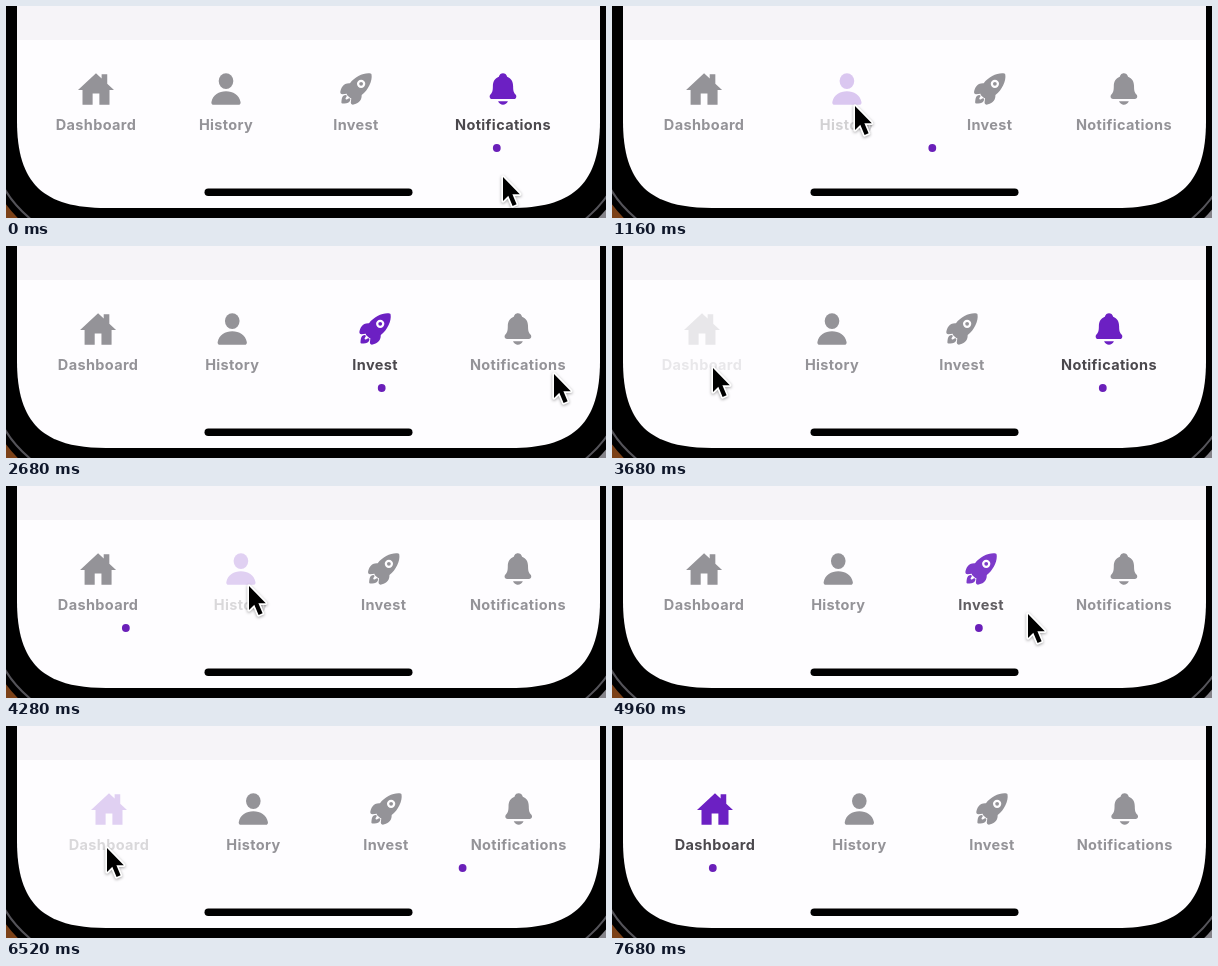
Animation, 600 px wide and 212 px high, one loop 7720 ms. Source, as an HTML page:

```html
<!DOCTYPE html>
<html lang="en">
<head>
<meta charset="utf-8">
<title>Tab bar</title>
<style>
  html, body { margin: 0; width: 100%; height: 100%; overflow: hidden; background: #000; }
  svg { display: block; width: 600px; height: 212px; }
  .tab { fill: #949398; }
  .tab text {
    font: 700 14.5px Inter, Roboto, sans-serif;
    letter-spacing: .35px;
    text-anchor: middle;
  }
  .tab.on { fill: #6c20c3; }
  .tab.on text { fill: #4b484d; }
  .icon { transform: translate(-18px, 65px) scale(.0703); }
  .cursor { filter: drop-shadow(0 1px 1.5px rgba(0, 0, 0, .35)); }
</style>
</head>
<body>
<svg viewBox="0 0 600 212">
  <defs>
    <clipPath id="screen">
      <path d="M11 0V115C11 178 38 202 100 202H505C567 202 594 178 594 115V0Z"/>
    </clipPath>
    <path id="rim" d="M-3 180Q7 199 27 215" fill="none" stroke="#55545a" stroke-width="2"/>
    <path id="corner" d="M-3 194Q5 206 15 215H-3Z"/>
  </defs>

  <rect width="600" height="212"/>
  <use href="#rim"/>
  <use href="#corner" fill="#7c4219"/>
  <g transform="matrix(-1 0 0 1 604 0)">
    <use href="#rim"/>
    <use href="#corner" fill="#85848a"/>
  </g>
  <g clip-path="url(#screen)">
    <rect width="600" height="212" fill="#fefdff"/>
    <rect width="600" height="34" fill="#f6f4f8"/>
  </g>
  <rect x="198.5" y="182.5" width="208" height="7.5" rx="3.75"/>

  <g class="tab">
    <path class="icon" d="M256 32L0 272H64V480H208V320H304V480H448V272H512L416 182V48H336V107Z"/>
    <text y="124">Dashboard</text>
  </g>
  <g class="tab">
    <g class="icon">
      <ellipse cx="256" cy="144" rx="104" ry="112"/>
      <path d="M80 480A31 31 0 0 1 49 440C68 340 156 288 256 288S444 340 463 440A31 31 0 0 1 432 480Z"/>
    </g>
    <text y="124">History</text>
  </g>
  <g class="tab">
    <g class="icon">
      <path d="M477 50Q474 38 462 35C370 20 240 80 170 175C70 170 45 240 32 302Q34 331 60 331L124 324Q125 338 134 347L166 378Q175 387 189 388L182 453Q182 478 210 480C270 468 340 440 337 343C430 272 492 142 477 50Z"/>
      <path d="M176 404C174 386 158 383 132 402C112 415 100 398 111 382L123 361C130 345 112 328 72 354C54 372 50 411 48 448Q49 464 64 464C100 462 144 455 158 440Q172 426 176 404Z"/>
      <circle cx="329" cy="183" r="43" stroke="#fefdff" stroke-width="32"/>
    </g>
    <text y="124">Invest</text>
  </g>
  <g class="tab">
    <path class="icon" d="M102 400C70 400 54 364 77 335C99 309 112 293 112 217C112 149 140 104 197 81C213 16 299 16 315 81C372 104 400 149 400 217C400 293 413 309 435 335C458 364 442 400 410 400ZM186 432H326C300 496 212 496 186 432Z"/>
    <text y="124">Notifications</text>
  </g>

  <circle id="dot" cy="142" r="3.9" fill="#6a1fb9"/>
  <path id="cursor" class="cursor" stroke="#fff" stroke-width="3.4" stroke-linejoin="round" paint-order="stroke"
    d="M1 3V27L6.3 21.8L10.6 32L14.6 30.3L10.4 20.3H17.8Z"/>
</svg>

<script>
const LOOP = 7720, FADE = 250;
const BAR_LEFT = 25, BAR_WIDTH = 554, DOT_INSET = 75.8;

// Width of a tab while selected, and where the pointer touches it
const home = { index: 0, width: 156, spot: [100, 119] };
const history = { index: 1, width: 151.5, spot: [242, 97] };
const invest = { index: 2, width: 151.5, spot: [372, 116] };
const bell = { index: 3, width: 164, spot: [508, 118] };

const taps = [
  [560, invest], [1086, history], [1720, home], [2310, invest], [2880, bell],
  [3705, home], [4240, history], [4745, invest], [5460, bell], [6490, home],
].map(([time, tab]) => ({ time, tab }));

// The pointer visits every tap and a few places in between.
const stops = [
  ...taps.map(({ time, tab }) => [time, ...tab.spot]),
  [0, 496, 168], [2680, 547, 125], [4960, 415, 125], [5760, 112, 128], [7160, 92, 224], [LOOP, 92, 224],
].sort((a, b) => a[0] - b[0]);

const nodes = [...document.querySelectorAll('.tab')];
const dot = document.getElementById('dot');
const cursor = document.getElementById('cursor');

const clamp = v => Math.min(1, Math.max(0, v));
const mix = (a, b, k) => a + (b - a) * k;
const inOutQuad = v => v < .5 ? 2 * v * v : 1 - 2 * (1 - v) ** 2;

// The selected tab takes its own width; the others share the rest.
const shareOf = tab => (BAR_WIDTH - tab.width) / 3;
const dotRest = tab => BAR_LEFT + tab.index * shareOf(tab) + DOT_INSET;

function centre(index, selected) {
  const share = shareOf(selected), extra = selected.width - share;
  const shift = index > selected.index ? extra : index === selected.index ? extra / 2 : 0;
  return BAR_LEFT + share * (index + .5) + shift;
}

// Underdamped spring running from 0 to 1
function spring(ms) {
  const s = ms / 1000, decay = 11, freq = 10.45;
  return 1 - Math.exp(-decay * s) * (Math.cos(freq * s) + decay / freq * Math.sin(freq * s));
}

// Fades to 0.2 while pressed, back to 1 after the release
function opacity(index, t) {
  return taps.filter(tap => tap.tab.index === index).reduce((value, { time }) => {
    const down = inOutQuad(clamp((t - time + 180) / 150));
    const up = inOutQuad(clamp((t - time - 35) / FADE));
    return value - .8 * (down - up);
  }, 1);
}

function pointerAt(t) {
  const i = stops.findIndex(stop => stop[0] > t);
  const [t0, x0, y0] = stops[i - 1], [t1, x1, y1] = stops[i];
  const k = inOutQuad(clamp(((t - t0) / (t1 - t0) - .13) / .75));
  return [mix(x0, x1, k), mix(y0, y1, k)];
}

function draw(t) {
  const past = taps.filter(tap => tap.time <= t);
  const rest = { time: -LOOP, tab: bell };
  const last = past.at(-1) ?? rest, before = past.at(-2) ?? rest;

  nodes.forEach((node, i) => {
    node.classList.toggle('on', i === last.tab.index);
    node.setAttribute('transform', `translate(${centre(i, last.tab)} 0)`);
    node.setAttribute('opacity', opacity(i, t));
  });
  dot.setAttribute('cx', mix(dotRest(before.tab), dotRest(last.tab), spring(t - last.time)));
  cursor.setAttribute('transform', `translate(${pointerAt(t)})`);
}

const begin = performance.now();
function tick() {
  draw((performance.now() - begin) % LOOP);
  requestAnimationFrame(tick);
}
tick();
</script>
</body>
</html>
```
